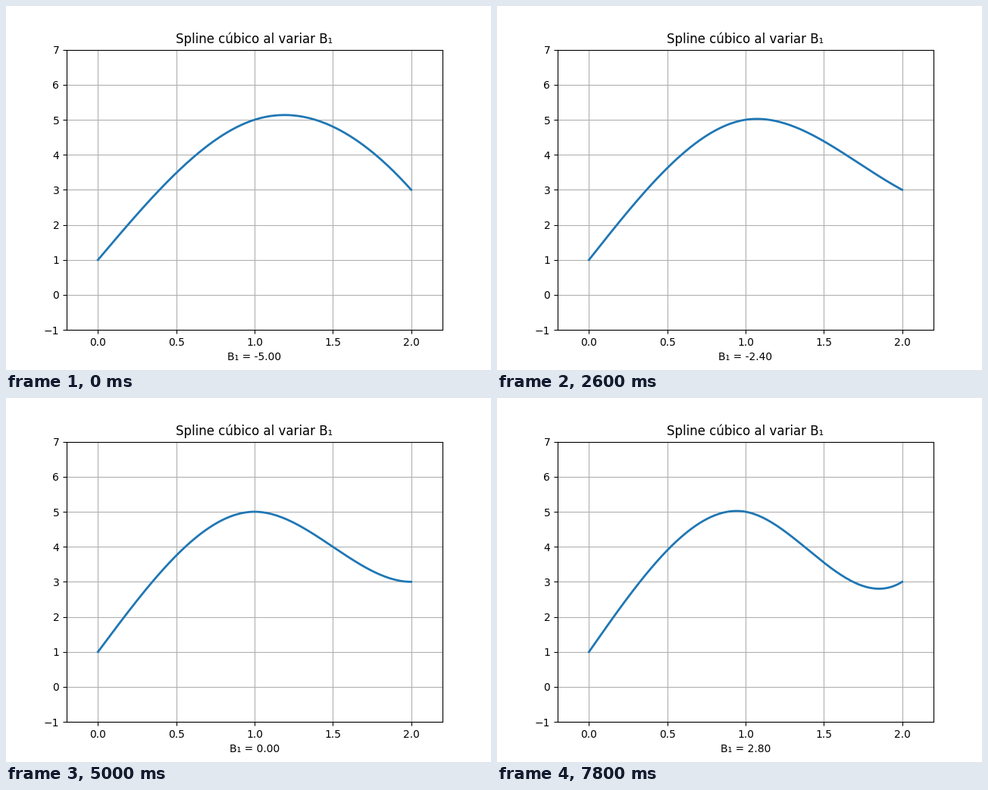
Write a matplotlib script that moves like this. It is 640 px wide and 480 px high and loops after 8000 ms.

```python
import numpy as np
import matplotlib.pyplot as plt
from matplotlib.animation import FuncAnimation

FRAMES = 40
INTERVAL = 200
KNOTS_Y = (1, 5, 3)  # at x = 0, 1, 2

x = np.linspace(0, 2, 201)


def segment(t, ya, yb, ma, mb):
    """Cubic on [0, 1] from end values and end second derivatives."""
    s = 1 - t
    return ya * s + yb * t + (ma * (s**3 - s) + mb * (t**3 - t)) / 6


def spline(slope):
    """Natural at the left end, given slope at the right end."""
    y0, y1, y2 = KNOTS_Y
    system = [[4, 1], [1, 2]]
    m1, m2 = np.linalg.solve(system, [6 * (y0 - 2 * y1 + y2), 6 * (slope - (y2 - y1))])
    return np.where(x <= 1, segment(x, y0, y1, 0, m1), segment(x - 1, y1, y2, m1, m2))


plt.rcParams["font.family"] = "DejaVu Sans"
fig, ax = plt.subplots(figsize=(6.4, 4.8), dpi=100)
ax.set_xlim(-0.2, 2.2)
ax.set_ylim(-1, 7)
ax.set_xticks(np.arange(0, 2.1, 0.5))
ax.grid(True)
ax.set_title("Spline cúbico al variar B₁")
line, = ax.plot([], [], lw=2)


def update(i):
    b1 = i / 5 - 5
    line.set_data(x, spline(b1))
    label = ax.set_xlabel(f"B₁ = {b1:.2f}")
    return line, label


anim = FuncAnimation(fig, update, frames=FRAMES, interval=INTERVAL, repeat=True, blit=False)
plt.show()
```
